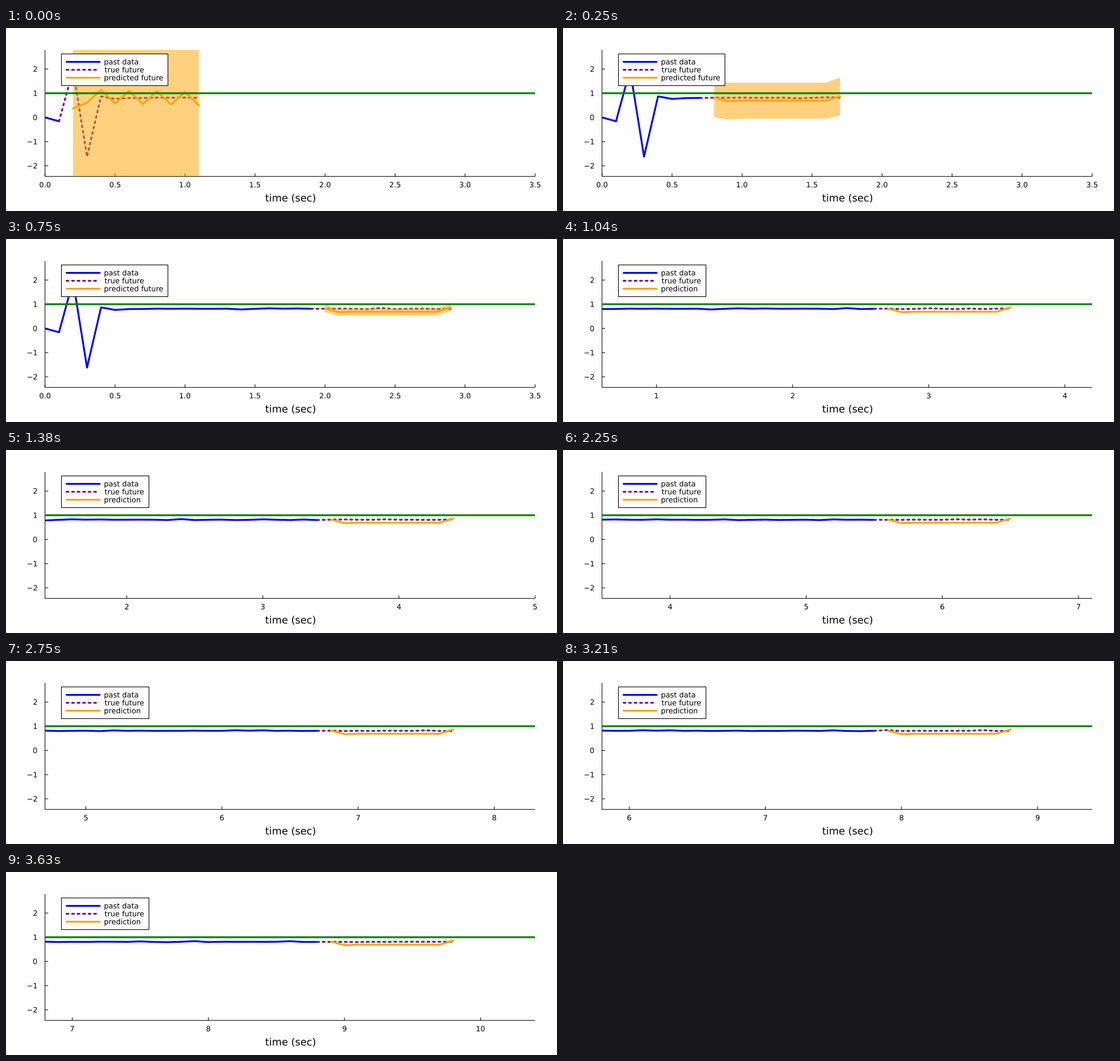
Recreate the animation shown at these times as a matplotlib script. Size 900 by 300 pixels, loop 3680 ms.

```python
import math

import matplotlib.pyplot as plt
import numpy as np
from matplotlib.animation import FuncAnimation
from matplotlib.patches import PathPatch, Polygon, Rectangle
from matplotlib.textpath import TextPath
from matplotlib.transforms import Affine2D

plt.rcParams["font.family"] = "DejaVu Sans"
plt.rcParams["path.snap"] = False

WIDTH, HEIGHT, DPI = 900, 300, 72  # at 72 dpi one point is one pixel
LEFT, RIGHT, TOP, BOTTOM = 63.75, 864.2, 36, 243.3
LOOP_MS, TICK_MS, STEPS, FPS = 3680, 10, 88, 24
DT, HORIZON = 0.1, 10
SCROLL_STEP = 19
DASHES = (0, (1, 2))

# Start-up transient, then a steady level with small bumps (hundredths)
TRANSIENT = [0, -0.16, 1.97, -1.62, 0.87, 0.765, 0.80, 0.805]
LEVEL = 0.812
BUMPS = {14: -2.7, 16: 1.8, 18: 1.2, 23: -1.2, 24: 2.8, 25: -1.2, 28: -1.2,
         30: 1.8, 32: -1.2, 33: 1, 34: -1.2, 36: 1.3, 39: 1.8, 44: 1.5,
         45: -1.4, 48: -1, 51: -1.4, 52: 1.5, 61: 2, 63: 1.8, 66: -0.8,
         69: -1, 75: 1.6, 76: -0.8, 77: -1.5, 79: 2.6, 80: -1.2, 86: 2.4,
         87: -0.8, 91: -1.4}
SAW = np.array([0.37, 0.61, 1.14, 0.57, 1.10, 0.55, 1.08, 0.53, 1.05, 0.49])
STEADY = np.array([0.82, 0.67] + [0.69] * 7 + [0.87])
BAND_SHAPE = np.array([1.08, 1.03] + [1] * 7 + [1.05])


def make_signal(count):
    rng = np.random.default_rng(4)
    signal = LEVEL + rng.uniform(-0.006, 0.006, count)
    signal[:len(TRANSIENT)] = TRANSIENT
    for i, bump in BUMPS.items():
        signal[i] = LEVEL + bump / 100
    return signal


signal = make_signal(STEPS + HORIZON + 1)
times = np.arange(len(signal)) * DT

fig = plt.figure(figsize=(WIDTH / DPI, HEIGHT / DPI), dpi=DPI, facecolor="white")
ax = fig.add_axes([0, 0, 1, 1])
ax.set(xlim=(0, WIDTH), ylim=(HEIGHT, 0))
ax.axis("off")
window = Rectangle((LEFT, TOP), RIGHT - LEFT, BOTTOM - TOP,
                   transform=ax.transData)


def to_y(value):
    return 146.6 - 39.67 * np.asarray(value)


def line(xs, ys, color="black", width=1, z=1, **style):
    caps = "butt" if width == 1 else "round"
    artist, = ax.plot(xs, ys, color=color, lw=width, zorder=z,
                      solid_capstyle=caps, dash_capstyle=caps,
                      solid_joinstyle="round", dash_joinstyle="round", **style)
    return artist


def label(x, y, text, size=12, ha="center", z=1):
    """Draw text as outlines, so that it keeps sub-pixel positions."""
    path = TextPath((0, 0), text, size=size)
    ink = path.get_extents()
    anchor = {"left": 0, "center": (ink.x0 + ink.x1) / 2, "right": ink.x1}[ha]
    place = Affine2D().translate(-anchor, 0).scale(1, -1).translate(x, y)
    return ax.add_patch(PathPatch(path.transformed(place), fc="black",
                                  ec="none", zorder=z))


def curve(color, z, **style):
    artist = line([], [], color, 3, z, **style)
    artist.set_clip_path(window)
    return artist


# Fixed axes
line([LEFT, LEFT], [TOP, BOTTOM])
line([LEFT, RIGHT], [BOTTOM, BOTTOM])
for value in range(-2, 3):
    y = to_y(value)
    line([LEFT, LEFT + 5], [y, y])
    label(50.5, y + 4.4, str(value).replace("-", "\u2212"), ha="right")
label(464.4, 284.4, "time (sec)", 16.5)

# Curves
past = curve("blue", 2)
future = curve("purple", 3, ls=DASHES)
band = ax.add_patch(Polygon([(0, 0), (0, 0), (0, 0)], fc="orange", ec="none",
                            alpha=0.5, zorder=4))
band.set_clip_path(window)
prediction = curve("orange", 5)
goal = curve("green", 6)
goal.set_data([LEFT, RIGHT], [to_y(1)] * 2)

# Legend
box = ax.add_patch(Rectangle((90.5, 42.5), 174, 52, fc="white", ec="black",
                             lw=1, zorder=7))
for i, (color, style) in enumerate([("blue", "-"), ("purple", DASHES),
                                    ("orange", "-")]):
    y = 55.5 + 13 * i
    line([99, 153], [y, y], color, 3, 8, ls=style)
label(160, 59.7, "past data", ha="left", z=8)
label(161, 72.7, "true future", ha="left", z=8)
long_name = label(160, 85.7, "predicted future", ha="left", z=8)
short_name = label(160, 85.7, "prediction", ha="left", z=8)

ticks = []
shown = None


def draw_ticks(start, end, to_x, step):
    while ticks:
        ticks.pop().remove()
    first, last = math.ceil(start / step - 1e-6), math.floor(end / step + 1e-6)
    for n in range(first, last + 1):
        x = to_x(n * step)
        ticks.append(line([x, x], [BOTTOM - 5, BOTTOM]))
        ticks.append(label(x, 261.2, f"{n * step:.1f}" if step < 1 else str(n)))


def draw_step(k):
    now = (k + 1) * DT
    start, end = max(0, now - 2), max(3.5, now + 1.6)
    scrolling = k >= SCROLL_STEP

    def to_x(t):
        return LEFT + (t - start) / (end - start) * (RIGHT - LEFT)

    draw_ticks(start, end, to_x, 1 if scrolling else 0.5)
    xs, ys = to_x(times), to_y(signal)
    first = max(0, k - 20)
    past.set_data(xs[first:k + 2], ys[first:k + 2])
    future.set_data(xs[k + 1:k + 2 + HORIZON], ys[k + 1:k + 2 + HORIZON])

    ahead = xs[k + 2:k + 2 + HORIZON]
    mix = max(0, 1 - k / 4)
    guess = mix * SAW + (1 - mix) * STEADY
    prediction.set_data(ahead, to_y(guess))

    half = 18.1 / (k + 1) ** 1.64 * BAND_SHAPE
    upper = np.column_stack([ahead, to_y(guess + half)])
    lower = np.column_stack([ahead, to_y(guess - half)])
    band.set_xy(np.vstack([upper, lower[::-1]]))
    band.set_visible(not scrolling)

    long_name.set_visible(not scrolling)
    short_name.set_visible(scrolling)
    box.set_width(143 if scrolling else 174)


def update(tick):
    """Hold each 24 fps step on a 10 ms clock."""
    global shown
    k = math.ceil((tick + 0.5) * TICK_MS * FPS / 1000) - 1
    k = min(k, STEPS - 1)
    if k != shown:
        draw_step(k)
        shown = k
    return []


anim = FuncAnimation(fig, update, frames=LOOP_MS // TICK_MS, interval=TICK_MS,
                     init_func=lambda: update(0), repeat=True, repeat_delay=0)
plt.show()
```
